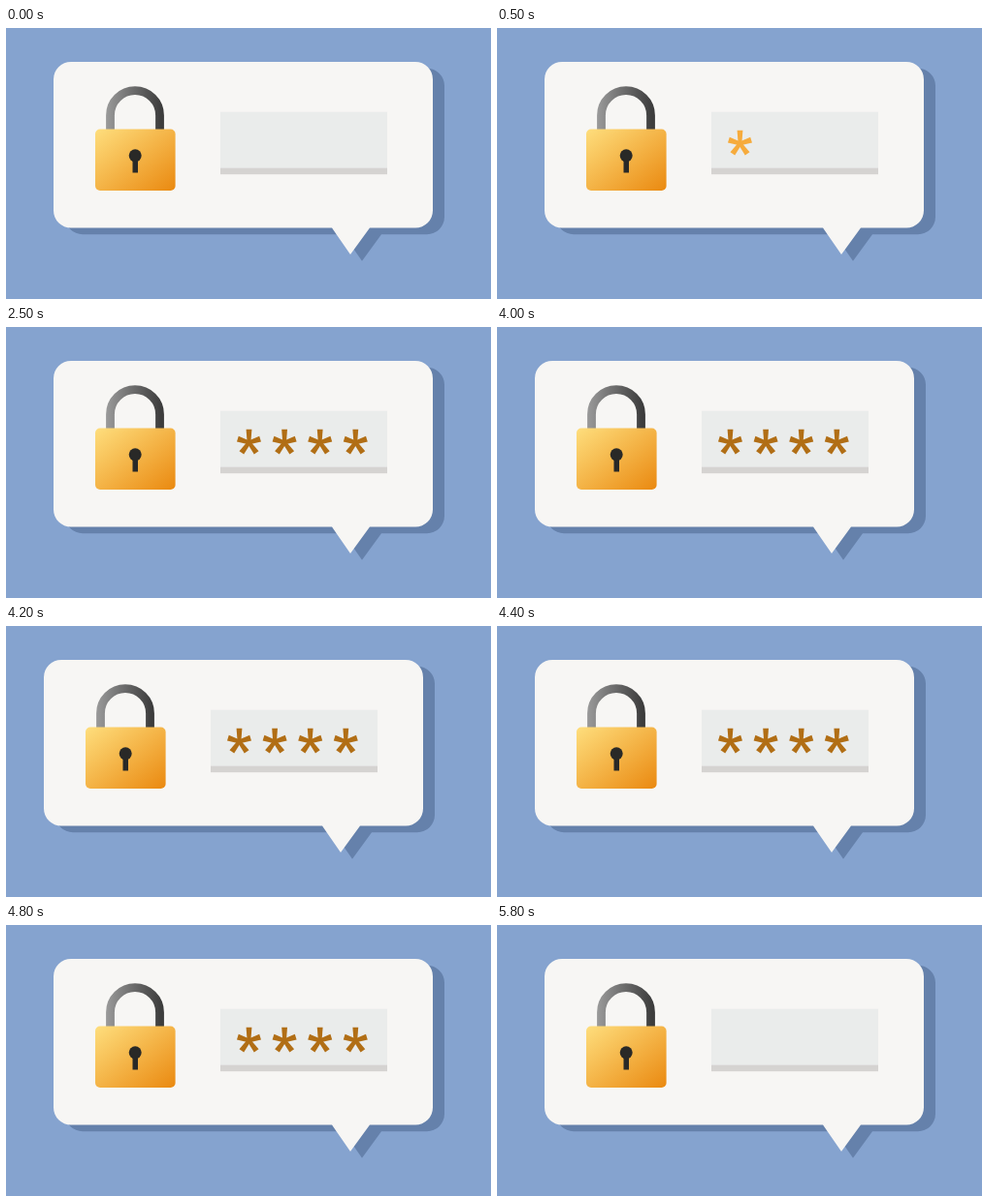
These frames come from a looping animation (500 by 280 pixels, 8800 ms). An HTML page:

```html
<!DOCTYPE html>
<html lang="en">
<head>
<meta charset="utf-8">
<title>Password prompt</title>
<style>
  html, body { margin: 0; width: 100%; height: 100%; overflow: hidden; background: #85a3cf; }
  svg { display: block; width: 500px; height: 280px; }
</style>
</head>
<body>
<svg viewBox="0 0 500 280">
  <defs>
    <linearGradient id="gold" x1="0" y1="0" x2="1" y2="1">
      <stop offset="0" stop-color="#fede7d"/>
      <stop offset="1" stop-color="#ea8910"/>
    </linearGradient>
    <linearGradient id="steel" gradientUnits="userSpaceOnUse" x1="103" y1="0" x2="163" y2="0">
      <stop offset="0" stop-color="#9a9a9a"/>
      <stop offset="1" stop-color="#383838"/>
    </linearGradient>
    <path id="bubble" d="M67 35H422a18 18 0 0 1 18 18V188.500a18 18 0 0 1-18 18H375L355 234 336 206.500H67a18 18 0 0 1-18-18V53a18 18 0 0 1 18-18z"/>
    <g id="star"></g>
  </defs>
  <g id="card">
    <use href="#bubble" x="12" y="6.700" fill="#6581ab"/>
    <use href="#bubble" fill="#f7f6f4"/>
    <path d="M107.500 108V90.200a25.500 25.500 0 0 1 51 0V108" fill="none" stroke="url(#steel)" stroke-width="8.800"/>
    <rect x="92" y="104.600" width="82.600" height="63.400" rx="5" fill="url(#gold)"/>
    <g fill="#292927">
      <circle cx="133.200" cy="131.800" r="6.500"/>
      <rect x="130.500" y="134" width="5.500" height="15.500"/>
    </g>
    <rect x="221" y="86.600" width="172" height="58.200" fill="#eaeceb"/>
    <rect x="221" y="144.600" width="172" height="6.600" fill="#d5d3d1"/>
    <g id="stars"></g>
  </g>
</svg>
<script>
  const LOOP = 8800;
  const card = document.getElementById('card');
  const stars = document.getElementById('stars');

  // Five arms, each widening outwards
  document.getElementById('star').innerHTML = [13.6, 12.2, 13, 13, 12.2].map((len, i) =>
    `<path d="M-1.800 1L-2.900 ${-len}H2.900L1.800 1z" transform="rotate(${i * 72})"/>`).join('');
  stars.innerHTML = [0, 1, 2, 3].map(i =>
    `<use href="#star" x="${250.5 + i * 36.6}" y="119.400"/>`).join('');

  function shake(t) {
    if (t < 4000 || t >= 4800) return 0;
    return Math.floor((t - 4000) / 100) % 2 ? 20 : -10;
  }

  function draw(t) {
    const count = t < 5800 ? Math.floor(t / 500) : 0;
    [...stars.children].forEach((star, i) => star.setAttribute('visibility', i < count ? 'visible' : 'hidden'));
    stars.setAttribute('fill', t < 2500 ? '#f6ab3c' : '#b16e15');
    card.setAttribute('transform', `translate(${shake(t)} 0)`);
  }

  const start = performance.now();
  function tick() {
    draw((performance.now() - start) % LOOP);
    requestAnimationFrame(tick);
  }
  tick();
</script>
</body>
</html>
```
